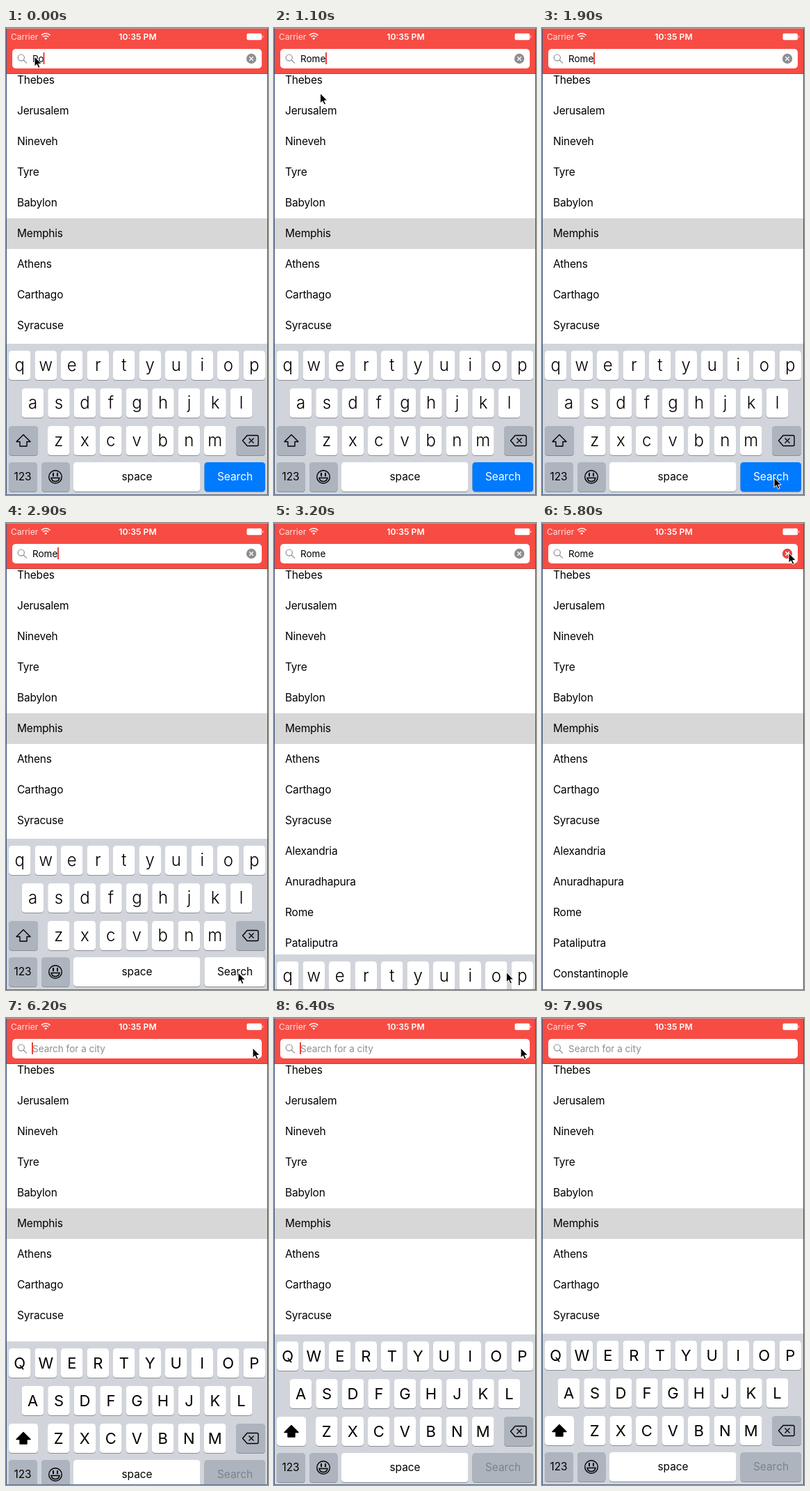
Recreate the animation shown at these times as an HTML page. Size 377 by 670 pixels, loop 8 s.

```html
<!DOCTYPE html>
<html lang="en">
<head>
<meta charset="utf-8">
<title>City search</title>
<style>
html, body { margin: 0; width: 100%; height: 100%; overflow: hidden; background: #fff; }
svg { display: block; width: 377px; height: 670px; font-family: Inter, "Open Sans", sans-serif; }
.city { font-size: 15.5px; letter-spacing: -.2px; }
.field { font-size: 13.5px; }
.key { font-size: 24px; font-weight: 300; text-anchor: middle; }
.upper { font-size: 22px; font-weight: 400; }
.label { font-size: 15.4px; text-anchor: middle; }
</style>
</head>
<body>
<svg viewBox="0 0 377 670">
  <rect width="377" height="670" fill="#fff"/>
  <rect y="273" width="377" height="44" fill="#d7d7d7"/>
  <g id="list"></g>

  <rect width="377" height="66" fill="#f74c44"/>
  <rect y="65" width="377" height="1" fill="#b4433e"/>
  <g fill="#fff">
    <text x="7" y="16.5" font-size="12" opacity=".85">Carrier</text>
    <text x="189.5" y="16.7" font-size="12.2" font-weight="600" text-anchor="middle">10:35 PM</text>
    <path d="M55.2 14.8L57.2 17L59.2 14.8A3 3 0 0 0 55.2 14.8Z"/>
    <path d="M53.2 12.8A5.7 5.7 0 0 1 61.2 12.8M51 10.4A8.8 8.8 0 0 1 63.4 10.4" fill="none" stroke="#fff" stroke-width="1.5"/>
    <rect x="346.5" y="7.8" width="21.5" height="9.4" rx="2"/>
    <path d="M369 10.5Q371 12.5 369 14.5Z"/>
    <rect x="9" y="30" width="359" height="28" rx="5"/>
  </g>
  <g fill="none" stroke="#8e8e93" stroke-width="1.2">
    <circle cx="21.8" cy="42.6" r="4.6"/>
    <path d="M25.2 46L30 50.6"/>
  </g>
  <text id="query" class="field" x="38" y="48.5"></text>
  <rect id="caret" y="35" width="2" height="17" fill="#ee3f38"/>
  <g id="clear">
    <circle id="clearDisc" cx="353" cy="44" r="7.2"/>
    <path d="M350.3 41.3l5.4 5.4m0-5.4l-5.4 5.4" stroke="#fff" stroke-width="1.3"/>
  </g>

  <g id="keyboard">
    <rect y="453" width="377" height="220" fill="#d1d5db"/>
    <g id="keys"></g>
    <path id="arrow" d="M25 583.5L35 593.5H30V600H20V593.5H15Z" stroke="#000" stroke-width="1.4" stroke-linejoin="round"/>
    <path d="M347 584.5H361Q363 584.5 363 586.5V597.5Q363 599.5 361 599.5H347L340.5 592Z M349.5 588.5l7 7m0-7l-7 7" fill="none" stroke="#000" stroke-width="1.4" stroke-linejoin="round"/>
    <g fill="none" stroke="#000" stroke-width="1.4">
      <circle cx="71" cy="644" r="9.3"/>
      <path d="M65 645.5H77Q76 650.5 71 650.5T65 645.5Z"/>
      <path d="M68 639v3.4M74 639v3.4" stroke-width="2" stroke-linecap="round"/>
    </g>
  </g>

  <path d="M.5 0V670M376.5 0V670" stroke="#3c547f"/>
  <path d="M0 669.5H377" stroke="#5c6f92"/>
  <path d="M0 .5H377" stroke="#b9a3a8"/>
  <path id="pointer" d="M0 0V14.2L3.3 11.2L5.6 16.4L8 15.4L5.7 10.4H10.2Z" fill="#000" stroke="#fff" stroke-width="1"/>
</svg>
<script>
const $ = id => document.getElementById(id);
const LOOP = 8000, KEYBOARD = 217, DARK = '#adb4be';

const cities = ['Thebes', 'Jerusalem', 'Nineveh', 'Tyre', 'Babylon', 'Memphis', 'Athens', 'Carthago',
  'Syracuse', 'Alexandria', 'Anuradhapura', 'Rome', 'Pataliputra', 'Constantinople'];
$('list').innerHTML = cities.map((c, i) => `<text class="city" x="16" y="${80.4 + 44 * i}">${c}</text>`).join('');

const cap = (x, y, w, fill, id = '') =>
  `<rect x="${x}" y="${y + 1}" width="${w}" height="42" rx="4.5" fill="#8b8e94"/>
   <rect id="${id}" x="${x}" y="${y}" width="${w}" height="42" rx="4.5" fill="${fill}"/>`;
const label = (x, s, id = '') => `<text id="${id}" class="label" x="${x}" y="649.3">${s}</text>`;

const rows = [['qwertyuiop', 4, 463], ['asdfghjkl', 22.75, 517], ['zxcvbnm', 60, 571]];
$('keys').innerHTML = rows.map(([letters, x0, y]) => [...letters].map((c, i) => {
  const x = x0 + 37.5 * i;
  return cap(x, y, 31.5, '#fff') + `<text class="key" x="${x + 15.75}" y="${y + 28.5}">${c}</text>`;
}).join('')).join('')
  + cap(4, 571, 42, DARK, 'shift') + cap(331, 571, 42, DARK)
  + cap(4, 623, 41, DARK) + cap(51, 623, 40.5, DARK)
  + cap(97, 623, 182.5, '#fff') + cap(285.5, 623, 87.5, '#007aff', 'search')
  + label(24, '123') + label(188.5, 'space') + label(329.5, 'Search', 'searchText');
const letterKeys = [...document.querySelectorAll('.key')];

const clamp = v => Math.max(0, Math.min(1, v));
const smooth = v => (v = clamp(v)) * v * (3 - 2 * v);
const fill = (id, color) => $(id).setAttribute('fill', color);
const show = (id, on) => $(id).setAttribute('opacity', +on);

// Pointer stops: start, end, from, to
const moves = [
  [950, 1780, [41, 41], [334, 645]],
  [3180, 3560, [334, 645], [380, 600]],
  [3880, 4380, [380, 300], [355, 43]],
  [6430, 6600, [355, 43], [380, 60]]
];
function pointerAt(t) {
  const [start, end, a, b] = moves.filter(m => t >= m[0]).pop() || moves[0];
  const k = smooth((t - start) / (end - start));
  return a.map((v, i) => v + (b[i] - v) * k);
}

function blink(t, onset) {
  const p = (((t - onset) % 870) + 870) % 870;
  return p < 300 ? 1 : Math.max(clamp((450 - p) / 150), clamp((p - 720) / 150));
}

// Distance the keyboard is pushed below its resting place
function keyboardDrop(t) {
  if (t < 3080) return 0;
  if (t < 5950) return Math.round(KEYBOARD * (1 - Math.exp(-.012 * (t - 3080))));
  return Math.round(KEYBOARD * Math.exp(-.012 * (t - 5950)));
}

let wasEmpty;
function draw(t) {
  const empty = t >= 5890, pressed = t >= 2790 && t < 3080;
  const typed = t < 290 ? 'Ro' : t < 590 ? 'Rom' : 'Rome';

  $('query').textContent = empty ? 'Search for a city' : typed;
  fill('query', empty ? '#8e8e93' : '#000');
  const caretX = empty ? 37 : { Ro: 53.5, Rom: 66, Rome: 74 }[typed];
  $('caret').setAttribute('x', caretX);
  show('caret', empty ? (t < 6600 ? 1 : blink(t, 7200)) : t < 1300 ? 1 : t < 3090 ? blink(t, 1870) : 0);

  show('clear', !empty);
  fill('clearDisc', t >= 5790 ? '#e8463f' : '#8e8e93');

  if (empty !== wasEmpty) {
    wasEmpty = empty;
    for (const k of letterKeys) {
      k.textContent = empty ? k.textContent.toUpperCase() : k.textContent.toLowerCase();
      k.classList.toggle('upper', empty);
    }
    fill('shift', empty ? '#fff' : DARK);
    fill('arrow', empty ? '#000' : 'none');
  }
  fill('search', empty ? DARK : pressed ? '#fff' : '#007aff');
  fill('searchText', empty ? '#7b828c' : pressed ? '#000' : '#fff');
  $('keyboard').setAttribute('transform', `translate(0 ${keyboardDrop(t)})`);
  $('pointer').setAttribute('transform', `translate(${pointerAt(t)})`);
}

function frame() {
  draw(performance.now() % LOOP);
  requestAnimationFrame(frame);
}
frame();
</script>
</body>
</html>
```
